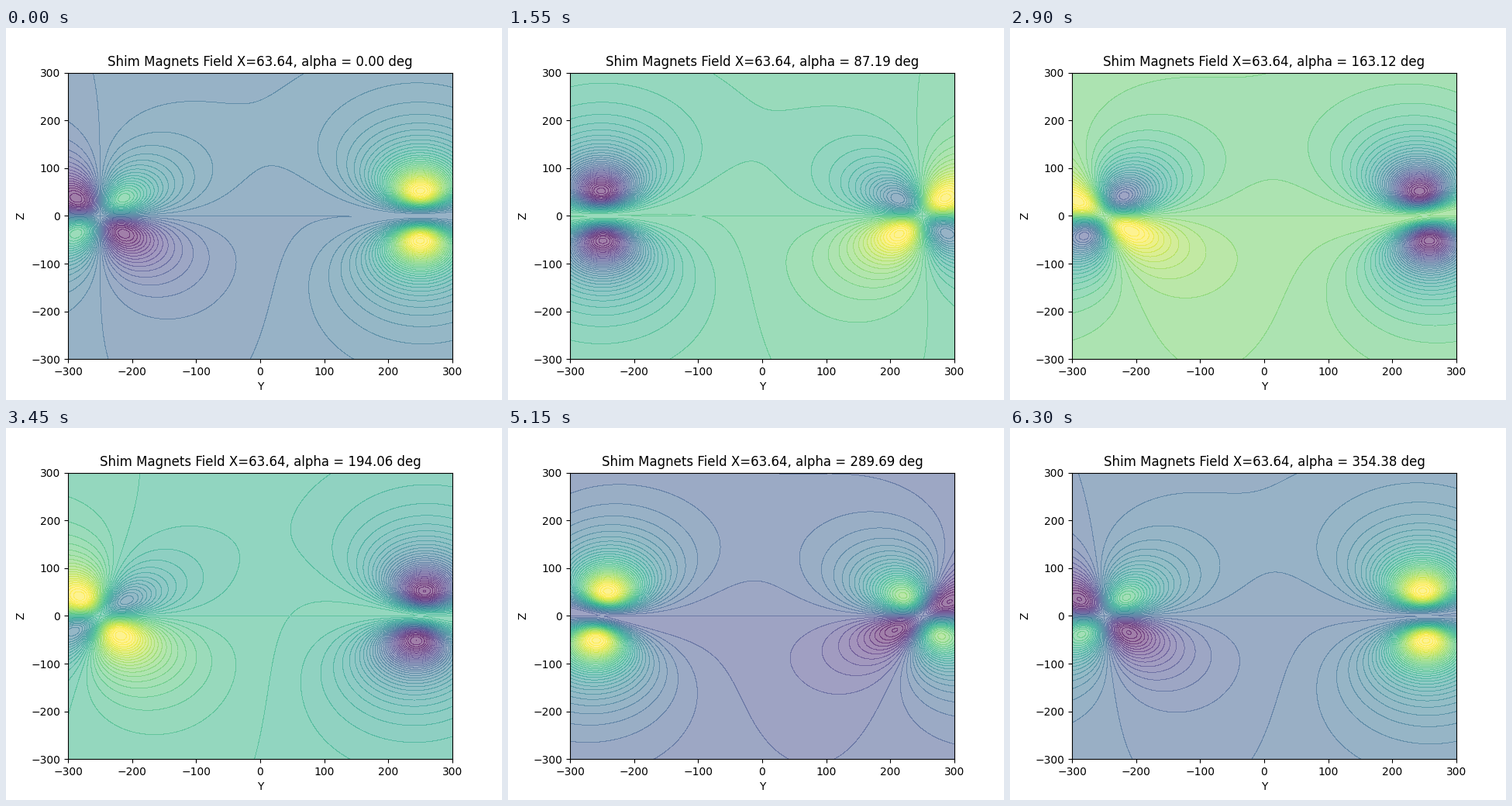
These frames come from a looping animation (640 px wide and 480 px high, 6.35 s). A matplotlib script:

```python
import numpy as np
import matplotlib.pyplot as plt
from matplotlib.animation import FuncAnimation

STEPS = 128          # steps in a full turn; the last one is left out
FRAMES = 127
INTERVAL = 50
LEVELS = 64
X = 90 / np.sqrt(2)  # distance of the plane from the magnets
OFFSET = 250         # magnets sit at Y = -OFFSET and Y = +OFFSET
STRENGTH = 6.98e7
TRIM = 0.045         # share of the range that saturates at each end

axis = np.linspace(-300, 300, 256)
Y, Z = np.meshgrid(axis, axis)


def kernels(y0):
    """Field terms of a magnet at y0 for moments along Y and along Z."""
    dy = Y - y0
    scale = STRENGTH * Z / (X**2 + dy**2 + Z**2) ** 2.5
    return dy * scale, Z * scale


left_y, left_z = kernels(-OFFSET)
right_y, right_z = kernels(OFFSET)


def field(alpha):
    s, c = np.sin(alpha), np.cos(alpha)
    return c * left_y - s * left_z + s * right_y + c * right_z


fig, ax = plt.subplots(figsize=(6.4, 4.8), dpi=100)
ax.set(xlim=(-300, 300), ylim=(-300, 300), xlabel="Y", ylabel="Z")
title = ax.set_title("")
fills = []


def update(i):
    while fills:
        fills.pop().remove()
    deg = 360 * i / STEPS
    f = field(np.radians(deg))
    pad = TRIM * np.ptp(f)
    # Unsmoothed translucent bands overlap by a pixel, which draws the lines.
    fills.append(ax.contourf(Y, Z, f, LEVELS, alpha=0.5, antialiased=False,
                             vmin=f.min() + pad, vmax=f.max() - pad))
    title.set_text(f"Shim Magnets Field X={X:.2f}, alpha = {deg:.2f} deg")
    return fills


anim = FuncAnimation(fig, update, frames=FRAMES, init_func=lambda: [],
                     interval=INTERVAL, repeat=True, repeat_delay=0)
plt.show()
```
